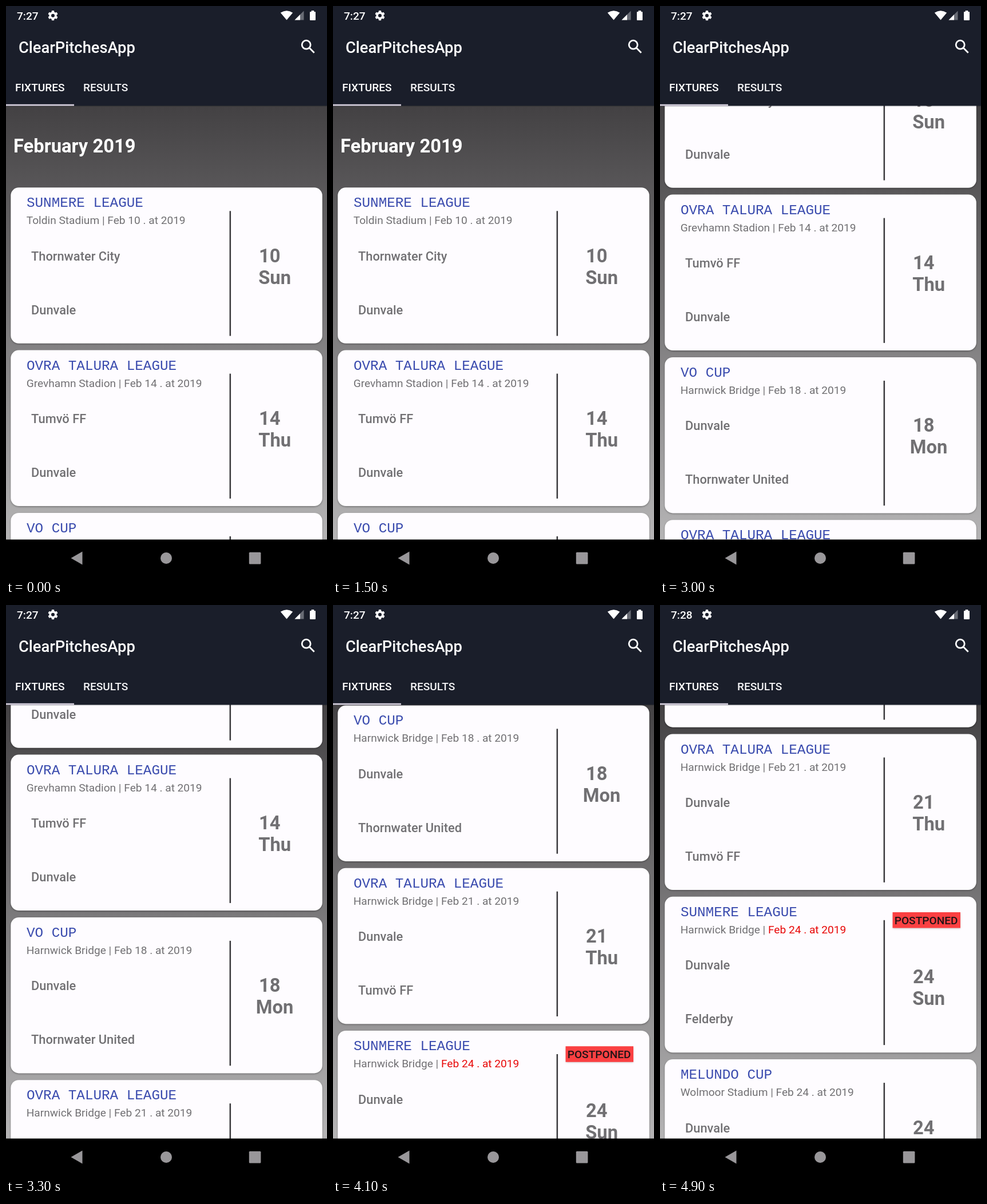
An HTML page with a canvas for the animation above (5 s loop, 561x998 px).

```html
<!DOCTYPE html>
<html lang="en">
<head>
<meta charset="utf-8">
<title>Fixtures</title>
<style>
  html, body { margin: 0; width: 100%; height: 100%; overflow: hidden; background: #000; }
  canvas { display: block; width: 561px; height: 998px; }
</style>
</head>
<body>
<canvas id="stage" width="561" height="998"></canvas>
<script>
const ctx = document.getElementById('stage').getContext('2d');
const WIDTH = 561, HEIGHT = 998, LOOP = 5000, STEP = 100;
const HEADER_BOTTOM = 174.5, NAV_TOP = 932.5;
const FIRST_CARD = 317.3, CARD_PITCH = 284.3, CARD_HEIGHT = 272.5;
const GREY = '#717073', NAV_GREY = '#99979a', NAVY = '#1a1e2a';

const HOME = 'Harnwick Bridge', CLUB = 'Dunvale';
const LEAGUE = 'SUNMERE LEAGUE', CONTINENTAL = 'OVRA TALURA LEAGUE';
const fixtures = [
  { league: LEAGUE, venue: 'Toldin Stadium', day: '10', name: 'Sun', teams: ['Thornwater City', CLUB] },
  { league: CONTINENTAL, venue: 'Grevhamn Stadion', day: '14', name: 'Thu', teams: ['Tumvö FF', CLUB] },
  { league: 'VO CUP', venue: HOME, day: '18', name: 'Mon', teams: [CLUB, 'Thornwater United'] },
  { league: CONTINENTAL, venue: HOME, day: '21', name: 'Thu', teams: [CLUB, 'Tumvö FF'] },
  { league: LEAGUE, venue: HOME, day: '24', name: 'Sun', teams: [CLUB, 'Felderby'], postponed: true },
  { league: 'MELUNDO CUP', venue: 'Wolmoor Stadium', day: '24', name: 'Sun', teams: [CLUB, 'Thornwater City'] }
];

// [time in ms, scroll offset in px]
const scrollKeys = [
  [0, 0], [2200, 0], [2300, 12], [2400, 62], [2500, 148], [2600, 222], [2700, 260], [2800, 272],
  [3100, 272], [3200, 298], [3300, 340], [3400, 340], [3500, 470], [3600, 585], [3700, 652.4],
  [3800, 673], [3900, 673], [4000, 682], [4100, 710.5], [4200, 738], [4300, 750], [4400, 750],
  [4500, 775], [4600, 840], [4700, 900], [4800, 932], [4900, 944.7], [LOOP, 944.7]
];

function scrollAt(time) {
  const next = scrollKeys.findIndex(key => key[0] > time);
  const [t0, y0] = scrollKeys[next - 1], [t1, y1] = scrollKeys[next];
  return y0 + (y1 - y0) * (time - t0) / (t1 - t0);
}

function text(string, x, y, size, color, weight = 400, family = 'Roboto, sans-serif') {
  ctx.font = `${weight} ${size}px ${family}`;
  ctx.fillStyle = color;
  ctx.fillText(string, x, y);
  return x + ctx.measureText(string).width;
}

function rect(x, y, w, h, color, radius = 0) {
  ctx.fillStyle = color;
  ctx.beginPath();
  ctx.roundRect(x, y, w, h, radius);
  ctx.fill();
}

function polygon(color, ...points) {
  ctx.fillStyle = color;
  ctx.beginPath();
  points.forEach(([x, y]) => ctx.lineTo(x, y));
  ctx.fill();
}

function disc(x, y, radius, color) {
  ctx.fillStyle = color;
  ctx.beginPath();
  ctx.arc(x, y, radius, 0, Math.PI * 2);
  ctx.fill();
}

function withShadow(blur, offset, alpha, draw) {
  ctx.save();
  ctx.shadowColor = `rgba(0,0,0,${alpha})`;
  ctx.shadowBlur = blur;
  ctx.shadowOffsetY = offset;
  draw();
  ctx.restore();
}

function drawCard(item, top) {
  withShadow(3, 1.3, 0.32, () => rect(8.3, top, 544.5, CARD_HEIGHT, '#fefcff', 14));
  text(item.league, 36, top + 34, 24.27, '#3a4bae', 400, '"Liberation Mono", monospace');
  const dateX = text(`${item.venue} | `, 35.7, top + 64, 19.11, GREY);
  text(`Feb ${item.day} . at 2019`, dateX, top + 64, 19.11, item.postponed ? '#e80808' : GREY);
  item.teams.forEach((team, i) => text(team, 44, top + 127.5 + i * 93.7, 21.84, GREY, 500));
  rect(390.6, top + 41, 2.5, 218.3, '#39383b');

  // The badge pushes the date down.
  const dayY = top + (item.postponed ? 151 : 130.4);
  text(item.day, 442, dayY, 32.76, GREY, 700);
  ctx.textAlign = 'center';
  text(item.name, 469.6, dayY + 38.1, 32.76, GREY, 700);
  ctx.textAlign = 'left';
  if (item.postponed) {
    withShadow(3, 1.5, 0.22, () => rect(406.5, top + 27.3, 118.5, 27.5, '#fb4042'));
    text('POSTPONED', 409.7, top + 48, 19.11, '#211416', 500);
  }
}

function drawList(scroll) {
  const shade = ctx.createLinearGradient(0, HEADER_BOTTOM, 0, NAV_TOP);
  shade.addColorStop(0, '#434143');
  shade.addColorStop(1, '#b5b4b5');
  ctx.fillStyle = shade;
  ctx.fillRect(0, HEADER_BOTTOM - 1, WIDTH, NAV_TOP - HEADER_BOTTOM + 2);
  text('February 2019', 13, 256 - scroll, 32.76, '#fff', 700);
  fixtures.forEach((item, i) => {
    const top = FIRST_CARD + i * CARD_PITCH - scroll;
    if (top < NAV_TOP && top + CARD_HEIGHT > HEADER_BOTTOM - 10) drawCard(item, top);
  });
}

function drawGear(x, y) {
  ctx.save();
  ctx.translate(x, y);
  disc(0, 0, 6.6, '#fff');
  for (let i = 0; i < 6; i++) {
    rect(-2.2, -8.6, 4.4, 5, '#fff', 0.8);
    ctx.rotate(Math.PI / 3);
  }
  disc(0, 0, 3, NAVY);
  ctx.restore();
}

function drawStatus(clock) {
  text(clock, 19, 23.8, 19.11, '#fff', 500);
  drawGear(82, 16.7);
  ctx.fillStyle = '#fff';
  ctx.beginPath();
  ctx.moveTo(490.5, 24.5);
  ctx.lineTo(479.8, 11.8);
  ctx.quadraticCurveTo(490.5, 4.6, 501.2, 11.8);
  ctx.fill();
  polygon('#696c75', [504.5, 24.5], [520.5, 24.5], [520.5, 8.5]);
  polygon('#fff', [504.5, 24.5], [514, 24.5], [514, 15]);
  rect(531, 10, 10, 15, '#fff', 1);
  rect(533.7, 8, 4.6, 3, '#fff');
}

function drawSearch() {
  ctx.strokeStyle = '#fff';
  ctx.lineWidth = 2.8;
  ctx.beginPath();
  ctx.arc(524.7, 67.7, 7.5, 0, Math.PI * 2);
  ctx.moveTo(530, 73);
  ctx.lineTo(538.7, 81.7);
  ctx.stroke();
}

function drawHeader(clock) {
  withShadow(2, 0.5, 0.25, () => rect(0, 0, WIDTH, HEADER_BOTTOM, NAVY));
  drawStatus(clock);
  text('ClearPitchesApp', 22, 81.5, 27.3, '#fff', 500);
  drawSearch();
  text('FIXTURES', 16, 149.3, 19.11, '#fff', 500);
  text('RESULTS', 135, 149.3, 19.11, '#f4f4f6', 500);
  rect(0, 171.8, 119, 2.7, '#d6d0de');
}

function drawNav() {
  rect(0, NAV_TOP, WIDTH, HEIGHT - NAV_TOP, '#000');
  polygon(NAV_GREY, [113.5, 965], [133.5, 953.5], [133.5, 976.5]);
  disc(280, 965, 10, NAV_GREY);
  rect(424.8, 954.8, 20.6, 20.6, NAV_GREY, 1.5);
}

function render(now) {
  const time = Math.floor((now % LOOP) / STEP) * STEP;
  drawList(scrollAt(time));
  drawHeader(time < 4700 ? '7:27' : '7:28');
  drawNav();
  requestAnimationFrame(render);
}

requestAnimationFrame(render);
</script>
</body>
</html>
```
